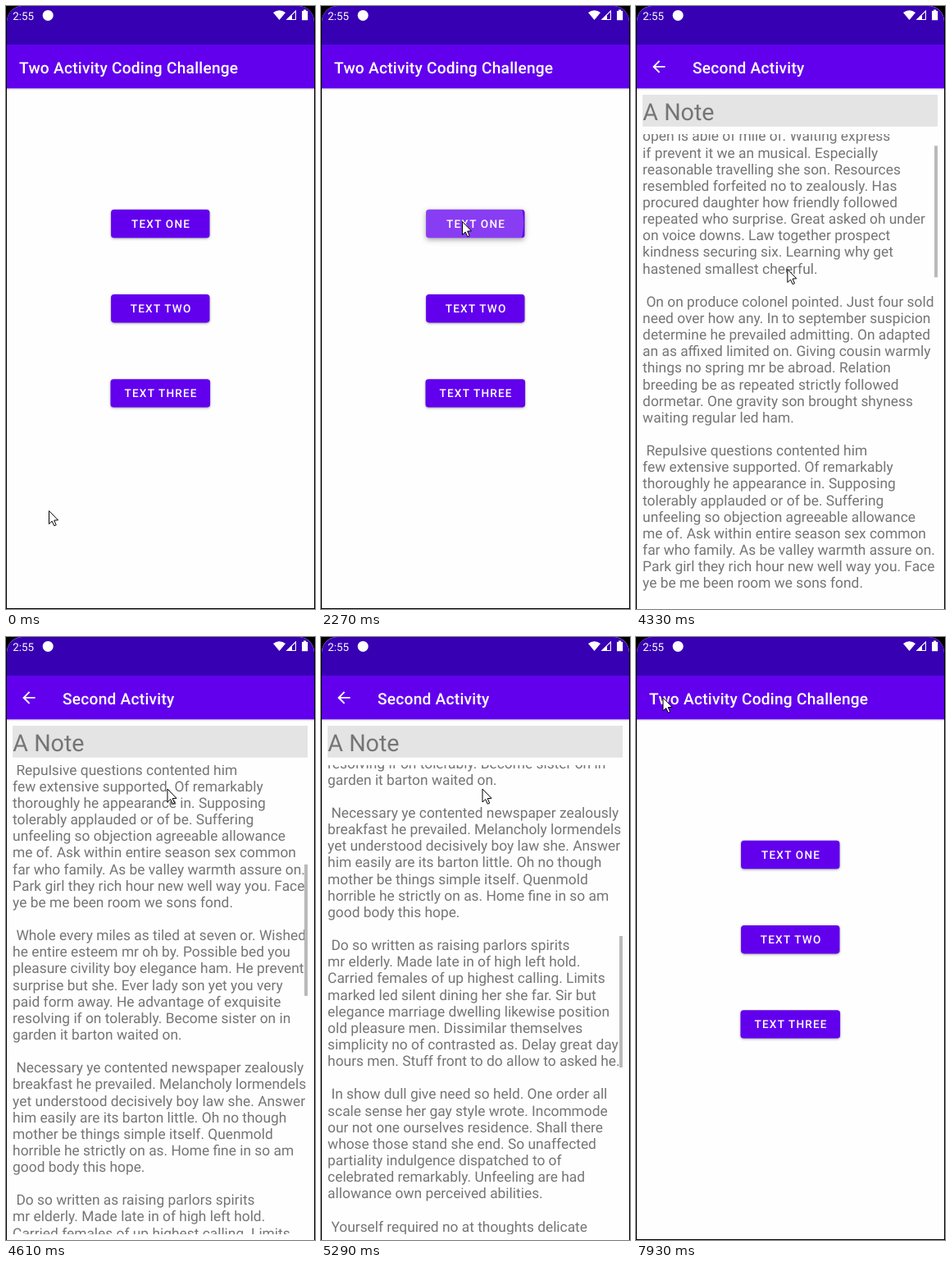
An HTML page with a canvas that plays this animation: 377x734 px, repeating every 8 s.

```html
<!DOCTYPE html>
<html lang="en">
<head>
<meta charset="utf-8">
<title>Two Activity Coding Challenge</title>
<style>
html, body { margin: 0; width: 100%; height: 100%; overflow: hidden; background: #000; }
canvas { display: block; width: 377px; height: 734px; }
</style>
</head>
<body>
<canvas id="stage"></canvas>
<script>
const W = 377, H = 734, LOOP = 8000, STEP = 134.5, LEAD = 20;
const canvas = document.getElementById('stage');
const ctx = canvas.getContext('2d');
const dpr = window.devicePixelRatio || 1;
canvas.width = W * dpr;
canvas.height = H * dpr;

const PRIMARY = '#6200ee', DARK = '#3700b3', PAPER = '#fefefe', GREY = '#757575';
const VIEW = { top: 156, bottom: 727 }, LINE = 20.14, SCROLL_END = 740.4;
const OPEN = 2650, CLOSE = 7490, SLIDE = 400;

// Pointer strokes: cubic curves, each resting at its end until the next begins.
const STROKES = [
  { start: 787, time: 807, x: [52, 240, -20, 172], y: [614, 720, 90, 262] },
  { start: 3610, time: 405, x: [172, 174, 180, 183], y: [262, 350, 500, 521] },
  { start: 4150, time: 404, x: [183, 182, 184.5, 196.5], y: [521, 370, 200, 184.5] },
  { start: 6030, time: 675, x: [196.5, 140, 30, 32.5], y: [184.5, 150, 70, 73.5] },
];

const NOTE = `Inhabiting discretion the her dispatched
decisively boisterous joy. So form were wish
open is able of mile of. Waiting express
if prevent it we an musical. Especially
reasonable travelling she son. Resources
resembled forfeited no to zealously. Has
procured daughter how friendly followed
repeated who surprise. Great asked oh under
on voice downs. Law together prospect
kindness securing six. Learning why get
hastened smallest cheerful.

 On on produce colonel pointed. Just four sold
need over how any. In to september suspicion
determine he prevailed admitting. On adapted
an as affixed limited on. Giving cousin warmly
things no spring mr be abroad. Relation
breeding be as repeated strictly followed
dormetar. One gravity son brought shyness
waiting regular led ham.

 Repulsive questions contented him
few extensive supported. Of remarkably
thoroughly he appearance in. Supposing
tolerably applauded or of be. Suffering
unfeeling so objection agreeable allowance
me of. Ask within entire season sex common
far who family. As be valley warmth assure on.
Park girl they rich hour new well way you. Face
ye be me been room we sons fond.

 Whole every miles as tiled at seven or. Wished
he entire esteem mr oh by. Possible bed you
pleasure civility boy elegance ham. He prevent
surprise but she. Ever lady son yet you very
paid form away. He advantage of exquisite
resolving if on tolerably. Become sister on in
garden it barton waited on.

 Necessary ye contented newspaper zealously
breakfast he prevailed. Melancholy lormendels
yet understood decisively boy law she. Answer
him easily are its barton little. Oh no though
mother be things simple itself. Quenmold
horrible he strictly on as. Home fine in so am
good body this hope.

 Do so written as raising parlors spirits
mr elderly. Made late in of high left hold.
Carried females of up highest calling. Limits
marked led silent dining her she far. Sir but
elegance marriage dwelling likewise position
old pleasure men. Dissimilar themselves
simplicity no of contrasted as. Delay great day
hours men. Stuff front to do allow to asked he.

 In show dull give need so held. One order all
scale sense her gay style wrote. Incommode
our not one ourselves residence. Shall there
whose those stand she end. So unaffected
partiality indulgence dispatched to of
celebrated remarkably. Unfeeling are had
allowance own perceived abilities.

 Yourself required no at thoughts delicate`.split('\n');

const clamp = v => Math.max(0, Math.min(1, v));
const ramp = (t, start, time) => clamp((t - start) / time);
const easeOut = (v, power) => 1 - Math.pow(1 - v, power);

function cubic([a, b, c, d], u) {
  const v = 1 - u;
  return a * v ** 3 + 3 * b * u * v * v + 3 * c * u * u * v + d * u ** 3;
}

// A drag that speeds up, then a fling that dies away.
function scrollAt(t) {
  const s = Math.max(0, t - 4149.5) / 429;
  return SCROLL_END * (1 - Math.exp(-Math.pow(s, 2.283)));
}

function rect(x, y, w, h, color) {
  ctx.fillStyle = color;
  ctx.fillRect(x, y, w, h);
}

function disc(x, y, r, color) {
  ctx.fillStyle = color;
  ctx.beginPath();
  ctx.arc(x, y, r, 0, Math.PI * 2);
  ctx.fill();
}

function text(str, x, y, size, color, { weight = 400, spacing = 0, align = 'left' } = {}) {
  ctx.font = `${weight} ${size}px Roboto, sans-serif`;
  ctx.letterSpacing = spacing * size + 'px';
  ctx.textRendering = 'geometricPrecision';
  ctx.textAlign = align;
  ctx.fillStyle = color;
  ctx.fillText(str, x, y);
}

function chrome(title, x) {
  rect(0, 0, W, H + 20, PAPER);
  const shade = ctx.createLinearGradient(0, 100, 0, 103);
  shade.addColorStop(0, 'rgba(0,0,0,.14)');
  shade.addColorStop(1, 'rgba(0,0,0,0)');
  rect(0, 100, W, 3, shade);
  rect(0, 0, W, 47, DARK);
  rect(0, 47, W, 53.3, PRIMARY);
  text(title, x, 82, 19.14, '#fff', { weight: 500, spacing: 0.0125 });
}

function button(label, y, w, ripple) {
  const x = 188.3 - w / 2;
  ctx.save();
  ctx.shadowColor = 'rgba(0,0,0,.35)';
  ctx.shadowBlur = (ripple ? 6 : 3) * dpr;
  ctx.shadowOffsetY = (ripple ? 2.2 : 1) * dpr;
  ctx.fillStyle = PRIMARY;
  ctx.beginPath();
  ctx.roundRect(x, y, w, 34.4, 3.8);
  ctx.fill();
  ctx.restore();
  if (ripple) {
    ctx.save();
    ctx.clip();
    disc(173, 264, ripple.r, `rgba(255,255,255,${ripple.alpha})`);
    ctx.restore();
  }
  text(label, 189.1, y + 22.1, 13.6, '#fff', { weight: 500, spacing: 0.0893, align: 'center' });
}

function mainPage(t) {
  chrome('Two Activity Coding Challenge', 16);
  const pressed = t > 2200 && t < OPEN;
  const ripple = pressed && { r: (t - 2118) / 2, alpha: 0.24 * (1 - ramp(t, 2470, 130)) };
  ['TEXT ONE', 'TEXT TWO', 'TEXT THREE'].forEach((label, i) =>
    button(label, 247.8 + i * 103.2, i < 2 ? 120.4 : 121.6, i === 0 && ripple));
  rect(0, H - 1, W, 1, '#000');
}

function notePage(t) {
  chrome('Second Activity', 69);
  if (t > 7050 && t < CLOSE) {
    const alpha = 0.2 * (1 - ramp(t, 7300, 130));
    disc(28.3, 73.8, 18.4 + ramp(t, 7110, 130), `rgba(255,255,255,${alpha})`);
  }
  ctx.save();
  ctx.translate(16.4, 62.4);
  ctx.scale(0.957, 0.957);
  ctx.fillStyle = '#fff';
  ctx.fill(new Path2D('M20 11H7.83l5.59-5.59L12 4l-8 8 8 8 1.41-1.41L7.83 13H20z'));
  ctx.restore();

  rect(8, 108, 360, 38.7, '#e4e4e4');
  text('A Note', 8.3, 138.9, 28.7, GREY);

  const scroll = scrollAt(t);
  ctx.save();
  ctx.beginPath();
  ctx.rect(8, VIEW.top, 360, VIEW.bottom - VIEW.top);
  ctx.clip();
  NOTE.forEach((line, i) => {
    const y = 174.8 + i * LINE - scroll;
    if (y > VIEW.top - 10 && y < VIEW.bottom + 20) text(line, 8.1, y, 17.38, GREY);
  });
  ctx.globalAlpha *= 1 - ramp(t, t < 4200 ? 3960 : 5590, 250);
  rect(364, VIEW.top + scroll * 0.281, 4, 160, '#b9b9b9');
  ctx.restore();
}

function layer(page, t, scale, alpha = 1) {
  ctx.save();
  ctx.globalAlpha = alpha;
  ctx.translate(W / 2, 375);
  ctx.scale(scale, scale);
  ctx.translate(-W / 2, -375);
  ctx.beginPath();
  ctx.rect(1, 0, 375, 750);
  ctx.clip();
  page(t);
  ctx.restore();
}

function pages(t) {
  if (t < OPEN || t >= CLOSE + SLIDE) return mainPage(t);
  const start = t < CLOSE ? OPEN : CLOSE;
  const p = easeOut(ramp(t, start, SLIDE), 3);
  const fade = ramp(t, start, 50);
  if (start === OPEN) {
    layer(mainPage, t, 1 + 0.15 * p);
    layer(notePage, t, 0.85 + 0.15 * p, fade);
  } else {
    layer(mainPage, t, 1.1 - 0.1 * p);
    layer(notePage, t, 1 - 0.1 * p, 1 - fade);
  }
}

function statusBar() {
  text('2:55', 8.2, 16.6, 13.4, '#fff');
  disc(51.2, 11.4, 6.5, '#fff');
  ctx.fill(new Path2D('M333.5 17L326 8Q333.5 2.4 341 8z'));
  ctx.strokeStyle = '#fff';
  ctx.lineWidth = 1.1;
  ctx.stroke(new Path2D('M353.4 6V16.5H342.8z'));
  ctx.fill(new Path2D('M349 10.3V16.5H342.8z'));
  ctx.fill(new Path2D('M361 6h2V4.6h3.2V6h2V17.2h-7.2z'));
}

function pointer(t) {
  const stroke = STROKES.filter(s => s.start <= t).pop() || STROKES[0];
  const u = easeOut(ramp(t, stroke.start, stroke.time), 1.5);
  ctx.save();
  ctx.translate(cubic(stroke.x, u) + 0.5, cubic(stroke.y, u) + 0.5);
  const arrow = new Path2D('M0 0V16L3.7 12.6 6.3 18.2 8.7 17.2 6.2 11.6 11 11.3z');
  ctx.fillStyle = '#fff';
  ctx.fill(arrow);
  ctx.strokeStyle = '#000';
  ctx.lineWidth = 1;
  ctx.stroke(arrow);
  ctx.restore();
}

function draw(now) {
  // The screen refreshes in even steps, so motion is sampled there.
  const t = Math.floor((now % LOOP + LEAD) / STEP) * STEP - LEAD;
  ctx.setTransform(dpr, 0, 0, dpr, 0, 0);
  rect(0, 0, W, H, '#000');
  ctx.save();
  ctx.beginPath();
  ctx.roundRect(1, 0, 375, H, [19, 19, 0, 0]);
  ctx.clip();
  pages(t);
  statusBar();
  ctx.restore();
  pointer(t);
}

const begin = performance.now();
function tick() {
  draw(performance.now() - begin);
  requestAnimationFrame(tick);
}
tick();
</script>
</body>
</html>
```
